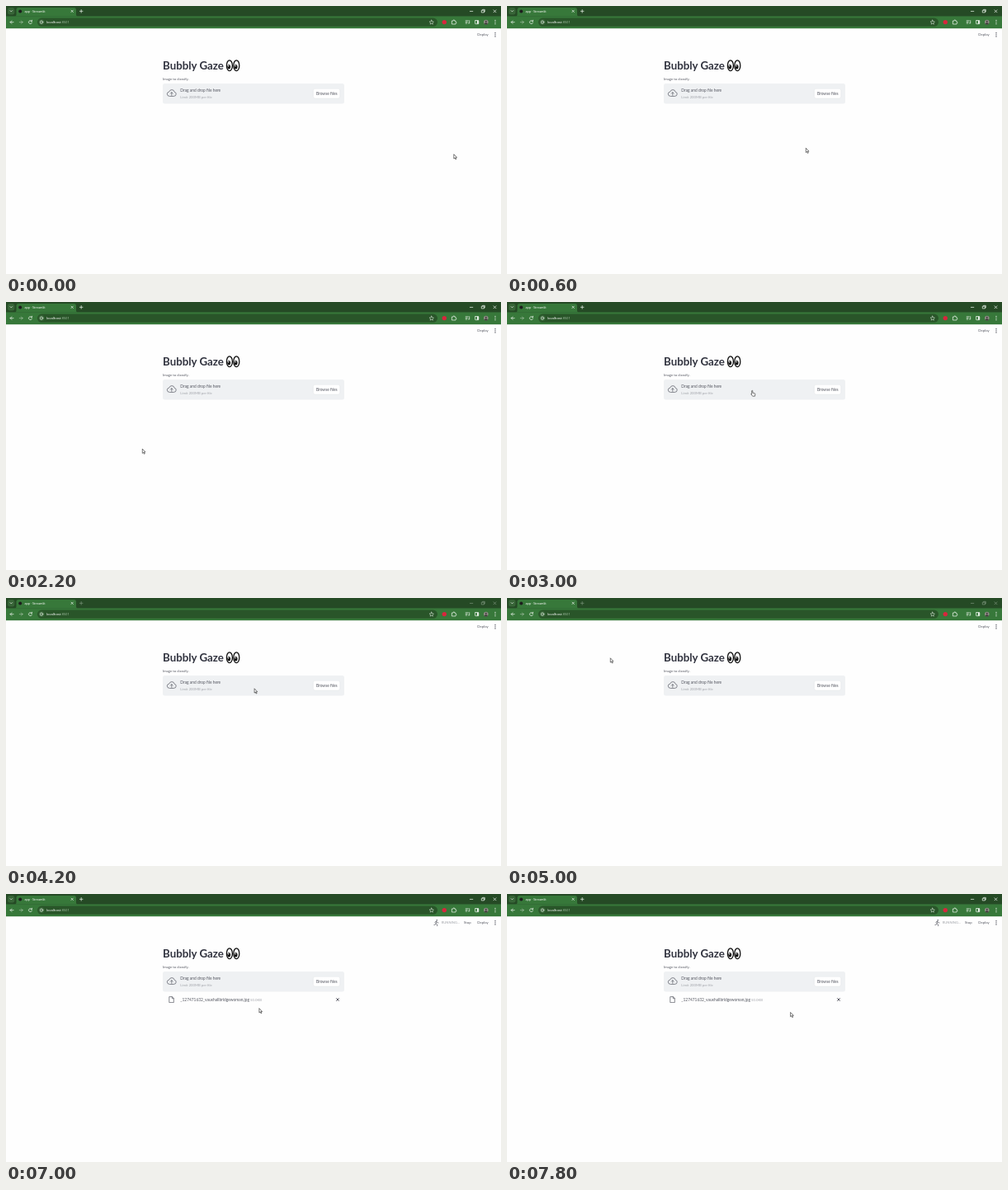
An HTML page that plays this animation: 600 by 325 pixels, repeating every 8000 ms.

```html
<!DOCTYPE html>
<html lang="en">
<head>
<meta charset="utf-8">
<title>app</title>
<style>
  html, body { margin: 0; width: 100%; height: 100%; overflow: hidden; background: #fff; }
  svg { display: block; width: 100%; height: 100%; }
  text { font-family: Lato, "Open Sans", sans-serif; font-size: 4.85px; fill: #555761; }
  .chrome text { font-family: "Noto Sans", "Open Sans", sans-serif; fill: #fff; }
  .line { fill: none; stroke: #e6efe6; stroke-width: .75; stroke-linecap: round; stroke-linejoin: round; }
  .ink { fill: none; stroke: #555761; stroke-width: .7; stroke-linecap: round; stroke-linejoin: round; }
  .small { font-size: 4.25px; }
  .pale { fill: #a3a5ab; }

  .focus { animation: focus 8s step-end infinite; }
  @keyframes focus { 0% { opacity: 1 } 40% { opacity: .42 } 80% { opacity: 1 } }
  .loaded { animation: loaded 8s step-end infinite; }
  @keyframes loaded { 0% { opacity: 0 } 85% { opacity: 1 } }
  .pose { animation: pose .8s step-end infinite; }
  .pose.alt { animation-delay: -.4s; }
  @keyframes pose { 0% { opacity: 1 } 50% { opacity: 0 } }
</style>
</head>
<body>
<svg viewBox="0 0 600 325" preserveAspectRatio="none">
  <defs>
    <g id="eye">
      <ellipse rx="3.5" ry="6.4" fill="#fff" stroke="#111" stroke-width="1.3"/>
      <ellipse cx="-.7" cy="1.5" rx="2" ry="2.7" fill="#111"/>
      <circle cx="-1.2" cy=".5" r=".7" fill="#fff"/>
    </g>
    <g id="dots"><circle cy="-2.1" r=".65"/><circle r=".65"/><circle cy="2.1" r=".65"/></g>
  </defs>

  <rect width="600" height="325" fill="#fefefe"/>

  <g class="chrome">
    <rect width="600" height="13" fill="#254a25"/>
    <rect y="12.4" width="600" height="14.8" fill="#37783a"/>
    <path d="M10 12.6Q12.5 12.6 12.5 10V4.5Q12.5 2 15 2H82.5Q85 2 85 4.5V10Q85 12.6 87.5 12.6Z" fill="#37783a"/>
    <rect x="2" y="2" width="8.4" height="8.4" rx="2.6" fill="#376537"/>
    <path class="line" d="M5 5.6l1.3 1.3 1.3-1.3"/>
    <circle cx="17.2" cy="6.4" r="2" fill="#1d1d1d"/>
    <text x="22.5" y="7.9" font-size="3.7" style="font-size:3.7px">app · Streamlit</text>
    <path class="line" d="M79 5.1l2.4 2.4m0-2.4l-2.4 2.4"/>
    <g class="focus">
      <path class="line" d="M89.4 6.3h3.6M91.2 4.5v3.6"/>
      <path class="line" stroke-width=".6" d="M562.4 6.4h3.4M576.7 5.2h2.7v2.7h-2.7zM577.6 5v-.7h2.7v2.7h-.7M591 4.8l3 3m0-3l-3 3"/>
    </g>

    <path class="line" d="M9 19.6H5.2m1.7-1.8l-1.8 1.8 1.8 1.8"/>
    <path class="line" opacity=".55" d="M16.3 19.6h3.8m-1.7-1.8l1.8 1.8-1.8 1.8"/>
    <path class="line" d="M31.2 18.5a2 2 0 1 0 .2 1.8M31.5 17.2v1.5H30"/>
    <rect x="38" y="14.4" width="485" height="10.4" rx="5.2" fill="#295529"/>
    <circle cx="43" cy="19.6" r="3.5" fill="#376537"/>
    <circle class="line" cx="43" cy="19.6" r="1.8" style="stroke-width:.6"/>
    <path class="line" d="M43 19.5v.8M43 18.6v.01" style="stroke-width:.5"/>
    <text x="49" y="21.2" style="font-size:4.1px">localhost<tspan fill="#9dba9d">:8501</tspan></text>
    <path class="line" d="M515.8 17.1l.8 1.7 1.8.2-1.3 1.3.3 1.8-1.6-.9-1.6.9.3-1.8-1.3-1.3 1.8-.2z" style="stroke-width:.55"/>
    <circle cx="531.3" cy="19.6" r="2.7" fill="#d7263d"/>
    <path class="line" d="M540.8 18h1.3q0-1.3.8-1.3t.8 1.3h1.3v1.4q1 0 1 .8t-1 .8v1h-4.2z"/>
    <path class="line" d="M557.2 17.8h3M557.2 19.4h2M557.2 21h1.6M561.7 17.7v3M560.6 20.9h.8"/>
    <rect class="line" x="568.6" y="17.5" width="4.2" height="4.2" rx=".5"/>
    <rect x="570.9" y="17.5" width="2" height="4.2" fill="#e6efe6"/>
    <circle cx="581.8" cy="19.6" r="2.8" fill="#8f8c86"/>
    <path d="M579.7 21.4q2.1-2.4 4.2 0a2.8 2.8 0 0 1-4.2 0" fill="#403c3c"/>
    <circle cx="581.8" cy="18.8" r="1" fill="#403c3c"/>
    <use href="#dots" x="593" y="19.6" fill="#e6efe6"/>
  </g>

  <text class="small" x="571.3" y="36.4">Deploy</text>
  <use href="#dots" x="593" y="34.8" fill="#31333f"/>

  <text x="190" y="76.6" style="font-size:13.3px;font-weight:700;fill:#31333f">Bubbly Gaze</text>
  <use href="#eye" x="270.9" y="72.2"/>
  <use href="#eye" x="279.3" y="72.2"/>

  <text class="small" x="190" y="90.3">Image to classify.</text>
  <rect x="190" y="94" width="220" height="24.4" rx="2.5" fill="#eff1f3"/>
  <path class="ink" d="M198 109.4q-2.7-.2-2.7-2.6t2.4-2.7q.8-2.5 3.3-2.5 2.7 0 3.2 2.7 2 .3 2 2.5 0 2.4-2.5 2.6zM200.8 108.3v-3.5m-1.4 1.3l1.4-1.4 1.4 1.4"/>
  <text x="211.3" y="104.4">Drag and drop file here</text>
  <text class="small pale" x="211.3" y="111.8">Limit 200MB per file</text>
  <rect x="372.4" y="100.3" width="32.4" height="11.8" rx="2.3" fill="#fff" stroke="#dfe1e4" stroke-width=".4"/>
  <text x="375.9" y="107.8">Browse files</text>

  <g class="loaded">
    <path class="ink" d="M198.2 124.6h3.2l1.9 2v5h-5.1zM201.3 124.7v2h1.9"/>
    <text x="211.3" y="129.6">_127471632_vauxhallbridgewoman.jpg</text>
    <text class="small pale" x="296" y="129.5">50.0KB</text>
    <path class="ink" d="M400.5 126.6l2.9 2.9m0-2.9l-2.9 2.9" style="stroke:#31333f;stroke-width:.8"/>
    <g class="pose">
      <circle cx="523" cy="32.2" r=".7" fill="#555761"/>
      <path class="ink" d="M519.2 33.6l2.2-.5 1.5 1.2-2 1.7 1.8 1.2v1M520.7 36l-1.5 1.8"/>
    </g>
    <g class="pose alt">
      <circle cx="522.3" cy="31.8" r=".7" fill="#555761"/>
      <path class="ink" d="M519.8 34.4l1.8-1.4 1 1.5 1.4.4M521.6 33.1l-.6 2.6 1.6 1.2.1 1.8M521 35.8l-.7 1.4-1.4.2"/>
    </g>
    <text class="pale" x="527.8" y="36.3" style="font-size:4.1px">RUNNING...</text>
    <text class="small" x="555" y="36.4">Stop</text>
  </g>

  <g id="pointer" stroke="#222" stroke-width=".6" stroke-linejoin="round" fill="#fff">
    <path id="arrow" d="M.3.3V5.6L1.5 4.5l.9 2 .9-.4-.9-1.9H4z"/>
    <path id="hand" d="M.2.6q.6-.6 1.1 0v2.6l2.5.6q.6.2.5 1L4 7.2H1.2L-.8 4.7q.2-.8 1 0z"/>
  </g>
</svg>
<script>
  const LOOP = 8000, STEP = 200;
  // time, x, y of the pointer tip
  const path = [
    [0, 542.5, 179.5], [400, 470, 172], [1000, 146, 172], [1400, 139.6, 173],
    [1800, 148, 163.6], [2000, 148, 163.6], [2400, 182, 192], [2800, 288, 122],
    [3000, 296.5, 107], [3200, 296.5, 107], [3800, 319, 132], [4200, 300.8, 109.5],
    [4400, 313, 105], [4800, 150, 76], [5200, 100, 69], [5400, 100, 69],
    [6000, 296.8, 145], [6400, 299, 144], [7000, 306.6, 138.3], [7400, 322, 165],
    [7800, 343.3, 143.2]
  ];
  const pointer = document.getElementById("pointer");
  const arrow = document.getElementById("arrow");
  const hand = document.getElementById("hand");

  function tipAt(t) {
    const i = path.findIndex(p => p[0] >= t);
    if (i <= 0) return path[0].slice(1);
    const [t0, x0, y0] = path[i - 1], [t1, x1, y1] = path[i];
    const k = (t - t0) / (t1 - t0);
    return [x0 + (x1 - x0) * k, y0 + (y1 - y0) * k];
  }

  function draw() {
    const now = document.timeline.currentTime ?? performance.now();
    const t = Math.floor(now % LOOP / STEP) * STEP;
    const grabbing = t >= 3000 && t < 3400;
    pointer.setAttribute("transform", `translate(${tipAt(t)})`);
    hand.style.display = grabbing ? "" : "none";
    arrow.style.display = grabbing ? "none" : "";
    requestAnimationFrame(draw);
  }
  draw();
</script>
</body>
</html>
```
